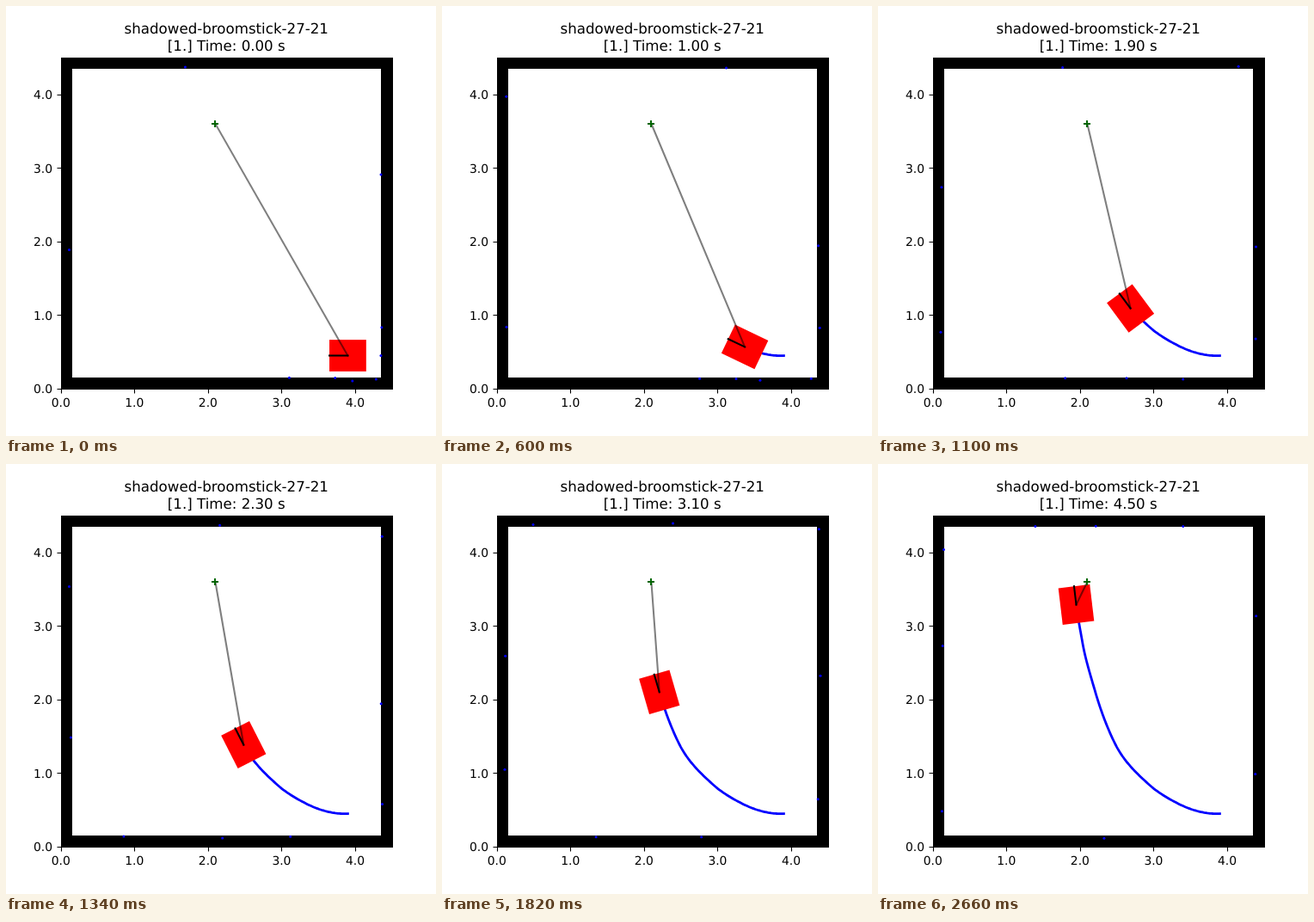
These frames come from a looping animation (500x500 px, 2.68 s). An HTML page:

```html
<!DOCTYPE html>
<html lang="en">
<head>
<meta charset="utf-8">
<title>Robot run</title>
<style>
  html, body { margin: 0; width: 100%; height: 100%; overflow: hidden; background: #fff; }
  svg { display: block; width: 500px; height: 500px; }
  text { font-family: "DejaVu Sans", sans-serif; font-size: 13.889px; text-rendering: geometricPrecision; }
  .title { font-size: 16.667px; text-anchor: middle; }
</style>
</head>
<body>
<svg viewBox="0 0 500 500">
  <rect width="500" height="500" fill="#fff"/>
  <text class="title" x="256.25" y="32">shadowed-broomstick-27-21</text>
  <text class="title" x="256.25" y="52" id="clock"></text>
  <g id="axes"></g>
  <path fill-rule="evenodd" d="M64 60H450V446H64ZM77 73H436V432H77Z"/>
  <path id="trail" fill="none" stroke="#00f" stroke-width="2.78" stroke-linecap="square" stroke-linejoin="round"/>
  <g id="body">
    <rect x="-21.39" y="-18.4" width="42.78" height="36.8" fill="#f00"/>
  </g>
  <path id="aim" stroke="#000" stroke-opacity=".5" stroke-width="2.08" stroke-linecap="square"/>
  <path id="nose" stroke="#000" stroke-width="2.08" stroke-linecap="square"/>
  <path d="M239 137H247M243 133V141" stroke="#006400" stroke-width="1.9"/>
  <g id="hits" fill="#00f"></g>
</svg>
<script>
const NS = "http://www.w3.org/2000/svg";
const LOOP = 2680, SCALE = 385 / 4.5;
const px = m => 63.75 + m * SCALE;
const py = m => 445 - m * SCALE;
const rad = deg => deg * Math.PI / 180;
const get = id => document.getElementById(id);

function add(parent, tag, attrs, text) {
  const el = document.createElementNS(NS, tag);
  for (const key in attrs) el.setAttribute(key, attrs[key]);
  if (text) el.textContent = text;
  parent.appendChild(el);
  return el;
}

// Ticks and labels
for (let i = 0; i < 5; i++) {
  const label = i + ".0", x = Math.round(px(i)), y = Math.round(py(i));
  const axes = get("axes");
  add(axes, "path", {
    d: `M${x + 0.5} 446V450.5M59.5 ${y + 0.5}H64`, stroke: "#000", "stroke-width": 1.11
  });
  add(axes, "text", { x: px(i), y: 466, "text-anchor": "middle" }, label);
  add(axes, "text", { x: 54, y: Math.round(py(i) + 5.28), "text-anchor": "end" }, label);
}

// Waypoints: seconds, x, y, heading (degrees, 0 = left, clockwise), speed, turn rate
const WAY = [
  [0, px(3.9), py(0.45), 0, 0, 0],
  [1, 352.1, 396.4, 25.6, 86, 38],
  [1.5, 316, 373.5, 41.7, 82, 31],
  [2.3, 276.3, 326.5, 63, 79, 20],
  [3.1, 252.75, 265.25, 73.8, 79, 10],
  [3.9, 237.75, 207.5, 80.1, 74, 6.5],
  [4.5, 230.5, 163.5, 83.2, 74, 4]
];

function hermite(a, va, b, vb, s, h) {
  const s2 = s * s, s3 = s2 * s, w = 3 * s2 - 2 * s3;
  return a + (b - a) * w + h * (va * (s3 - 2 * s2 + s) + vb * (s3 - s2));
}

function pose(t) {
  let i = 0;
  while (i < WAY.length - 2 && t > WAY[i + 1][0]) i++;
  const [t0, x0, y0, a0, v0, w0] = WAY[i];
  const [t1, x1, y1, a1, v1, w1] = WAY[i + 1];
  const h = t1 - t0, s = (t - t0) / h;
  return {
    x: hermite(x0, -v0 * Math.cos(rad(a0)), x1, -v1 * Math.cos(rad(a1)), s, h),
    y: hermite(y0, -v0 * Math.sin(rad(a0)), y1, -v1 * Math.sin(rad(a1)), s, h),
    a: hermite(a0, w0, a1, w1, s, h)
  };
}

// Range sensor: nine beams, each marched to the wall in 0.05 m steps
const BEAMS = 9, SPACING = 39.8, STEP = 0.05 * SCALE;
const dots = Array.from({ length: BEAMS }, () => add(get("hits"), "circle", { r: 1.5 }));

function castBeam(p, i) {
  const a = rad(p.a + 180 + (i - 4) * SPACING);
  const dx = -Math.cos(a), dy = -Math.sin(a);
  const rx = ((dx > 0 ? px(4.35) : px(0.15)) - p.x) / dx;
  const ry = ((dy > 0 ? py(0.15) : py(4.35)) - p.y) / dy;
  const r = Math.ceil(Math.min(rx, ry) / STEP - 0.02) * STEP;
  return [p.x + dx * r, p.y + dy * r];
}

function draw(step) {
  const t = step / 10, p = pose(t), a = rad(p.a);
  get("clock").textContent = `[1.] Time: ${t.toFixed(2)} s`;

  let d = "";
  for (let i = 0; i <= step * 3; i++) {
    const q = pose(i / 30);
    d += `${i ? "L" : "M"}${q.x.toFixed(2)} ${q.y.toFixed(2)}`;
  }
  get("trail").setAttribute("d", d);

  get("body").setAttribute("transform", `translate(${p.x} ${p.y}) rotate(${p.a})`);
  get("aim").setAttribute("d", `M${px(2.1)} ${py(3.6)}L${p.x} ${p.y}`);
  get("nose").setAttribute("d",
    `M${p.x} ${p.y}l${-21.39 * Math.cos(a)} ${-21.39 * Math.sin(a)}`);

  dots.forEach((dot, i) => {
    const [x, y] = castBeam(p, i);
    dot.setAttribute("cx", x);
    dot.setAttribute("cy", y);
  });
}

// Steps alternate between 20 ms and 100 ms
let shown = -1;
function tick() {
  const ms = performance.now() % LOOP;
  const step = 2 * Math.floor(ms / 120) + (ms % 120 >= 20 ? 1 : 0);
  if (step !== shown) draw(shown = step);
  requestAnimationFrame(tick);
}
tick();
</script>
</body>
</html>
```
